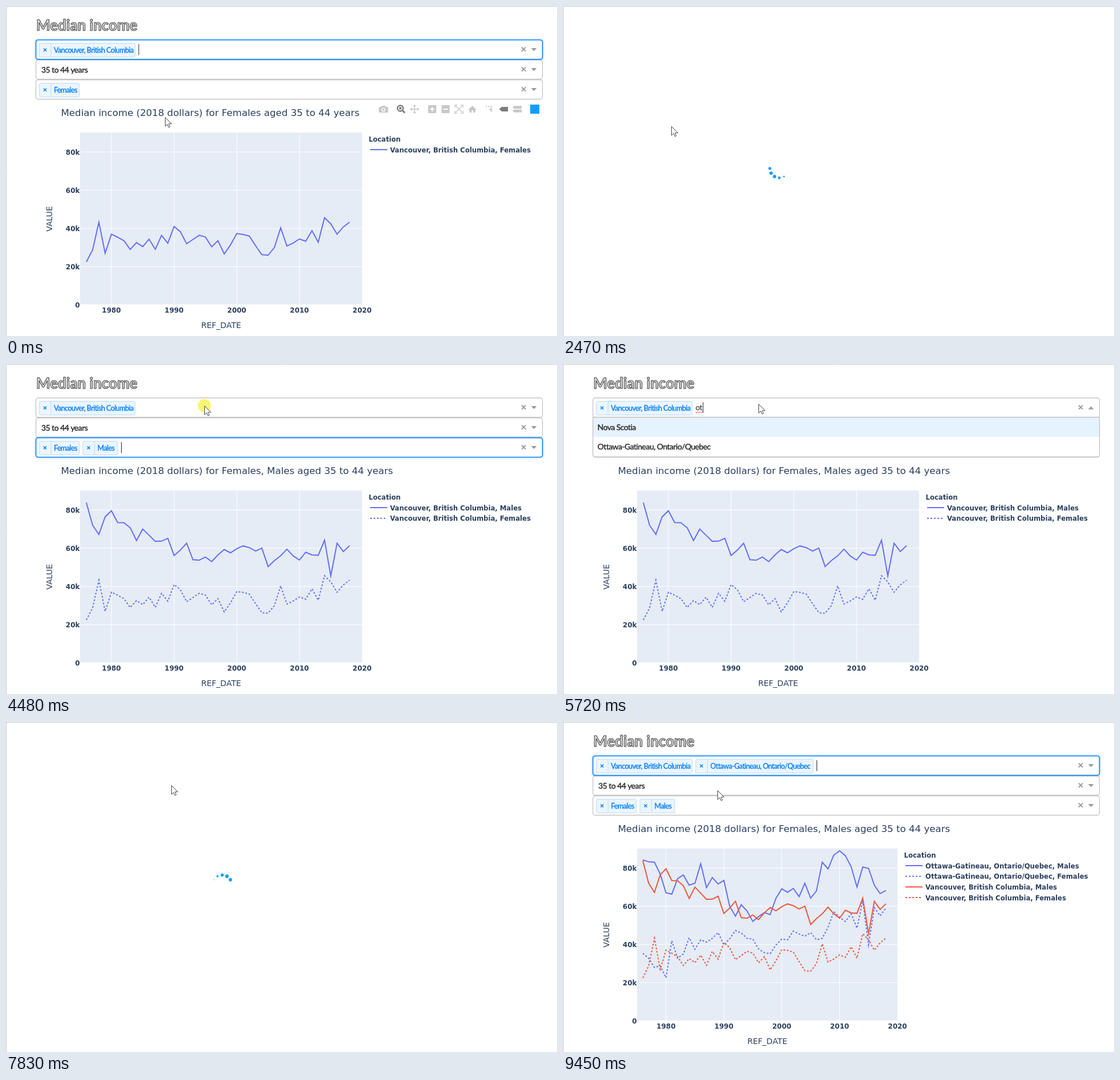
An HTML page with a canvas for the animation above (9.85 s loop, 967 by 579 pixels).

```html
<!DOCTYPE html>
<html lang="en">
<head>
<meta charset="utf-8">
<title>Median income</title>
<style>
  html, body { margin: 0; width: 100%; height: 100%; overflow: hidden; background: #fff; }
  canvas { display: block; }
</style>
</head>
<body>
<canvas id="stage" width="967" height="579"></canvas>
<script>
const ctx = document.getElementById('stage').getContext('2d');
const LOOP = 9850;
const BLUE = '#007eff', INK = '#2a3f5f', INDIGO = '#636efa', RED = '#ef553b';
const PLAIN = '"DejaVu Sans", sans-serif', HAND = 'Lato, sans-serif';
const ROW_Y = [59, 94, 129], LEFT = 52.5, WIDTH = 889;
const PLOT = { left: 130, top: 222, bottom: 524.5 };

// Yearly values in thousands, 1976 to 2018
const vancouverFemales = [22.5, 28.8, 43.3, 27, 37, 35.4, 33.6, 29, 32.6, 30.5, 34.4, 29.1, 36.4, 32.3, 41,
  38.3, 32, 34.2, 36.4, 35.5, 30.4, 33.6, 26.7, 31.4, 37.3, 36.9, 36, 31, 26.3, 26,
  30, 40.3, 30.8, 32.4, 34.5, 33.3, 38.8, 32.8, 45.6, 42.4, 37, 40.8, 43.3];
const vancouverMales = [83.8, 72, 67.2, 76.4, 79.6, 73.4, 73.3, 70.7, 64, 70, 66.8, 63.6, 63.7, 65.2, 56.2,
  59, 62.6, 54, 53.7, 55.4, 53, 56.5, 59.3, 57.6, 59.7, 61.2, 60.3, 58.5, 60, 50.4,
  53.5, 56, 59.5, 56, 53.8, 57.9, 56.5, 56.3, 64.2, 45.5, 62.6, 58.3, 61.3];
const ottawaMales = [84.2, 83.2, 83, 76.8, 67, 66.3, 74.4, 76.3, 71, 72, 82.2, 69.7, 75, 71.6, 73.5,
  60, 54.8, 60.8, 57.5, 52, 54.6, 56.7, 55.6, 64.2, 69.1, 67.3, 69.3, 65, 72, 64.2,
  68, 83, 79.5, 86.8, 89, 86.4, 80.6, 70, 80.5, 79.8, 71, 66.6, 68.2];
const ottawaFemales = [35.3, 32.8, 28, 28.8, 22.6, 42, 32.8, 35, 43.5, 37.5, 42.4, 41.2, 43.2, 46.2, 39.8,
  43, 47.3, 46, 43.2, 42.8, 37.6, 35.7, 35.2, 39.7, 42.8, 42.4, 47, 45.5, 44.3, 46.2,
  42.5, 43.2, 49, 57.2, 54.2, 52, 56, 48.5, 63, 39.8, 59.2, 55, 59];

const VANCOUVER = { label: 'Vancouver, British Columbia', width: 169 };
const OTTAWA = { label: 'Ottawa-Gatineau, Ontario/Quebec', width: 207 };
const FEMALES = { label: 'Females', width: 71 };
const MALES = { label: 'Males', width: 62 };
const LOCATIONS = ['Canada', 'Atlantic provinces', 'Newfoundland and Labrador', 'Prince Edward Island',
  'Nova Scotia', 'New Brunswick', 'Quebec', 'Ontario', 'Manitoba', OTTAWA.label, 'Toronto, Ontario'];

// Each row holds from its start time until the next one
const CURSOR = [
  [0, 279, 195], [450, 272, 190], [620, 250, 172], [790, 228, 155], [960, 216, 148],
  [1620, 212, 170], [1690, 207, 193], [1860, 190, 211],
  [3790, 205, 200], [3960, 250, 160], [4130, 310, 105], [4310, 340, 80], [4480, 348, 73], [4630, 343, 70],
  [6590, 325, 88], [6700, 300, 104], [6820, 291, 111], [7130, 290, 111],
  [9070, 285, 113], [9260, 276, 118], [9450, 271, 120]];
const TYPED = [[0, ''], [4940, 'o'], [5720, 'ot'], [5950, 'ott'], [7430, '']];
// Start, focused row, whether its menu is open, caret blink origin
const FOCUS = [[0, 0, false, -380], [1130, 2, true, 1690], [2470, 2, false, 3250],
  [4630, 0, true, 4630], [7430, 0, false, 8270]];
const CLICKS = [[960, 1300], [2160, 2470], [4480.1, 4940], [7130, 7430]];
const LOADING = [[2470, 3250], [7430, 8210]];

const at = (keys, t) => keys.findLast(key => key[0] <= t);
const within = (spans, t) => spans.some(([from, to]) => t >= from && t < to);
const mod = (a, n) => ((a % n) + n) % n;

function text(string, x, y, font, color, align = 'left', spacing = 0) {
  ctx.font = font;
  ctx.fillStyle = color;
  ctx.textAlign = align;
  ctx.letterSpacing = spacing + 'px';
  ctx.fillText(string, x, y);
}

function handText(string, x, y, size, color) {
  text(string, x, y, `${size}px ${HAND}`, color, 'left', -0.53);
  ctx.strokeStyle = color;
  ctx.lineWidth = 0.35;
  ctx.strokeText(string, x, y);
}

function line(points, color, width, dash = []) {
  ctx.beginPath();
  points.forEach(([x, y]) => ctx.lineTo(x, y));
  ctx.strokeStyle = color;
  ctx.lineWidth = width;
  ctx.setLineDash(dash);
  ctx.stroke();
  ctx.setLineDash([]);
}

function shape(points, color) {
  ctx.beginPath();
  points.forEach(([x, y]) => ctx.lineTo(x, y));
  ctx.closePath();
  ctx.fillStyle = color;
  ctx.fill();
}

function box(x, y, w, h, radius, fill, stroke, width = 1) {
  ctx.beginPath();
  ctx.roundRect(x, y, w, h, radius);
  if (fill) { ctx.fillStyle = fill; ctx.fill(); }
  if (stroke) { ctx.strokeStyle = stroke; ctx.lineWidth = width; ctx.stroke(); }
}

function dot(x, y, r, color) {
  ctx.beginPath();
  ctx.arc(x, y, r, 0, 7);
  ctx.fillStyle = color;
  ctx.fill();
}

function cross(x, y, r, color, width) {
  line([[x - r, y - r], [x + r, y + r]], color, width);
  line([[x - r, y + r], [x + r, y - r]], color, width);
}

function drawHeading() {
  ctx.lineJoin = 'round';
  text('Median income', 53, 43, `bold 26px ${HAND}`, '#ddd');
  ctx.strokeStyle = '#333';
  ctx.lineWidth = 1;
  ctx.strokeText('Median income', 53, 43);
  ctx.lineJoin = 'miter';
}

function drawRow(row, tags, focused, open, typed, caretOn) {
  const y = ROW_Y[row];
  const active = focused && !open;
  if (active) box(LEFT - 2, y - 1.5, WIDTH + 4, 38, 6, null, 'rgba(0,126,255,.1)', 3);
  box(LEFT, y + 0.5, WIDTH, 34, 4, '#fff', active ? BLUE : '#c4c4c4', active ? 1.6 : 1.3);
  let x = 58;
  for (const { label, width } of tags) {
    box(x + 0.5, y + 6.5, width - 1, 24, 2, '#ebf5ff', '#b9dbff');
    line([[x + 21, y + 6.5], [x + 21, y + 30.5]], '#b9dbff', 1);
    cross(x + 10.5, y + 18, 2.5, BLUE, 1.5);
    handText(label, x + 26, y + 22.5, 12.5, BLUE);
    x += width + 5.5;
  }
  if (!tags.length) handText('35 to 44 years', 62, y + 22.5, 14, '#222');
  if (focused) {
    let end = x;
    if (typed) {
      text(typed, x, y + 22, `14px ${HAND}`, '#222', 'left', -0.5);
      end += ctx.measureText(typed).width + 1;
      const wave = [];
      for (let i = x; i < end; i += 2) wave.push([i, y + 25 + (wave.length % 2) * 1.6]);
      line(wave, '#e33', 1);
    }
    if (caretOn) line([[end + 0.5, y + 8], [end + 0.5, y + 27]], '#222', 1);
  }
  cross(908.5, y + 17, 3.6, '#999', 1.9);
  const flip = open ? -1 : 1, mid = y + (open ? 18 : 17.5);
  shape([[921.5, mid - 2.5 * flip], [931.5, mid - 2.5 * flip], [926.5, mid + 2.5 * flip]], '#999');
}

function drawMenu(row, options, highlighted) {
  const top = ROW_Y[row] + 34.5, step = 34.5;
  const height = Math.min(options.length * step, 193);
  ctx.save();
  ctx.beginPath();
  ctx.roundRect(LEFT, top, WIDTH, height + 0.5, [0, 0, 4, 4]);
  ctx.clip();
  ctx.fillStyle = '#fff';
  ctx.fill();
  options.forEach((option, i) => {
    const y = top + i * step;
    if (i === highlighted) box(LEFT, y, WIDTH, step, 0, '#e5f2ff');
    handText(option, 60.5, y + 22, 14, '#222');
  });
  ctx.restore();
  box(LEFT, top, WIDTH, height + 0.5, [0, 0, 4, 4], null, '#c4c4c4', 1.3);
}

function drawChart(sexes, series, right) {
  const { left, top, bottom } = PLOT;
  const xOf = year => left + (year - 1975) * (right - left) / 45;
  const yOf = value => bottom - value * 3.355;
  box(left, top, right - left, bottom - top, 0, '#e5ecf6');
  for (let year = 1980; year <= 2020; year += 10) {
    const x = xOf(year);
    if (year < 2020) line([[x, top], [x, bottom]], '#fff', 1);
    text(String(year), x, 538, `bold 12px ${PLAIN}`, INK, 'center');
  }
  for (let value = 0; value <= 80; value += 20) {
    const y = yOf(value);
    line([[left, y], [right, y]], '#fff', value ? 1 : 2);
    text(value ? value + 'k' : '0', 129.5, y + 4.5, `bold 12px ${PLAIN}`, INK, 'right');
  }
  for (const { data, color, dash } of series)
    line(data.map((value, i) => [xOf(1976 + i), yOf(value)]), color, 2, dash);

  const wide = right === 641 || right === 603;
  text(`Median income (2018 dollars) for ${sexes} aged 35 to 44 years`, wide ? 97.5 : 96.5, 193,
    `16.66px ${PLAIN}`, INK);
  text('REF_DATE', (left + right) / 2, 565, `14px ${PLAIN}`, INK, 'center');
  ctx.save();
  ctx.translate(81, 373.5);
  ctx.rotate(-Math.PI / 2);
  text('VALUE', 0, 0, `14px ${PLAIN}`, INK, 'center');
  ctx.restore();

  const legend = right + 11.5;
  text('Location', legend, 237.5, `bold 11.65px ${PLAIN}`, INK);
  series.forEach(({ name, color, dash }, i) => {
    const y = 252 + i * 18.7;
    line([[legend + 2.5, y], [legend + 32.5, y]], color, 2, dash);
    text(name, legend + 37.5, y + 4.5, `bold 11.65px ${PLAIN}`, INK);
  });
}

function drawToolbar() {
  const pale = '#c7c7c7', dark = '#7c7c7c', y = 181;
  // camera
  box(654.5, y - 4, 16, 10, 1.5, pale);
  box(659, y - 6, 7, 3, 1, pale);
  dot(662.5, y + 1, 3.5, '#fff');
  dot(662.5, y + 1, 2, pale);
  // magnifier
  ctx.beginPath();
  ctx.arc(692, y - 1.5, 5, 0, 7);
  ctx.strokeStyle = dark;
  ctx.lineWidth = 2.4;
  ctx.stroke();
  box(690, y - 3.5, 4, 4, 0, dark);
  line([[695.5, y + 2], [700, y + 6.5]], dark, 2.8);
  // pan
  line([[710, y], [724, y]], pale, 1.5);
  line([[717, y - 7], [717, y + 7]], pale, 1.5);
  for (let i = 0; i < 4; i++) {
    const dx = Math.cos(i * Math.PI / 2), dy = Math.sin(i * Math.PI / 2);
    shape([[717 + 8 * dx, y + 8 * dy], [717 + 5 * dx + 3 * dy, y + 5 * dy + 3 * dx],
      [717 + 5 * dx - 3 * dy, y + 5 * dy - 3 * dx]], pale);
  }
  // zoom in, zoom out
  for (const x of [748, 771.5]) {
    box(x - 7, y - 7, 14, 14, 1, pale);
    line([[x - 4, y], [x + 4, y]], '#fff', 2);
  }
  line([[748, y - 4], [748, y + 4]], '#fff', 2);
  // autoscale
  cross(795, y, 5, pale, 1.5);
  for (const sx of [-1, 1]) for (const sy of [-1, 1])
    line([[795 + 3 * sx, y + 7 * sy], [795 + 7 * sx, y + 7 * sy], [795 + 7 * sx, y + 3 * sy]], pale, 1.6);
  // home
  shape([[811, y + 1], [818.5, y - 6], [826, y + 1]], pale);
  box(813.5, y, 10, 6, 0, pale);
  box(817, y + 2, 3, 4, 0, '#fff');
  // spike lines
  dot(851, y + 0.5, 2.2, pale);
  line([[842, y - 4.5], [852, y - 4.5]], pale, 2, [2, 2]);
  line([[852, y - 5], [852, y + 6]], pale, 2, [2, 2]);
  // hover labels
  shape([[865.5, y], [870, y - 4], [881, y - 4], [881, y + 4], [870, y + 4]], dark);
  for (const dy of [-3.2, 3.2])
    shape([[889, y + dy], [892, y + dy - 2.5], [905, y + dy - 2.5], [905, y + dy + 2.5], [892, y + dy + 2.5]], pale);
  box(920, y - 8, 16, 16, 0, '#119dff');
}

function drawSpinner(t) {
  const head = 6 + (t - 2470) / 100;
  for (let i = 0; i < 12; i++) {
    const behind = mod(head - i, 12);
    const r = behind < 6 ? 3.1 * Math.max(0, Math.cos((behind - 1.4) * 0.42)) : 0;
    const angle = i * Math.PI / 6;
    dot(379.5 + 16.5 * Math.cos(angle), 285 + 16.5 * Math.sin(angle), r, '#119dff');
  }
}

function drawCursor(x, y) {
  ctx.save();
  ctx.translate(x + 0.5, y + 0.5);
  const arrow = [[0, 0], [0, 15.5], [3.6, 12.2], [6, 17.4], [8.4, 16.4], [6, 11.3], [11, 11]];
  shape(arrow, '#fff');
  line([...arrow, arrow[0]], '#444', 1);
  ctx.restore();
}

function getSeries(bothSexes, bothPlaces) {
  const make = (place, sex, data, color) =>
    ({ name: `${place.label}, ${sex}`, data, color, dash: bothSexes && sex === 'Females' ? [3, 3] : [] });
  const color = bothPlaces ? RED : INDIGO;
  const series = [make(VANCOUVER, 'Females', vancouverFemales, color)];
  if (bothSexes) series.unshift(make(VANCOUVER, 'Males', vancouverMales, color));
  if (bothPlaces) series.unshift(make(OTTAWA, 'Males', ottawaMales, INDIGO),
    make(OTTAWA, 'Females', ottawaFemales, INDIGO));
  return series;
}

function drawPage(t, cursorY) {
  const [, focus, open, blink] = at(FOCUS, t);
  const typed = at(TYPED, t)[1];
  const caretOn = mod(t - blink, 1060) < 530 || (t >= 8210 && t < blink);
  const bothSexes = t >= 2470, bothPlaces = t >= 7430;
  const places = bothPlaces ? [VANCOUVER, OTTAWA] : [VANCOUVER];
  const sexes = bothSexes ? [FEMALES, MALES] : [FEMALES];
  // The chart settles 16px narrower shortly after each reload
  const settling = within([[3250, 3790], [8210, 8750]], t);
  const right = (bothPlaces ? 587 : 625) + (settling ? 16 : 0);

  drawHeading();
  drawChart(sexes.map(sex => sex.label).join(', '), getSeries(bothSexes, bothPlaces), right);
  if (cursorY > 164 && !open) drawToolbar();
  // The focused row goes last so that its border stays on top
  [0, 1, 2].sort((a, b) => (a === focus) - (b === focus)).forEach(row =>
    drawRow(row, [places, [], sexes][row], row === focus, open && row === focus, typed, caretOn));
  if (open && focus === 2) drawMenu(2, ['Both sexes', 'Males'], t < 1860 ? 0 : 1);
  if (open && focus === 0)
    drawMenu(0, LOCATIONS.filter(name => name.toLowerCase().includes(typed)), 0);
}

function draw(t) {
  const [, x, y] = at(CURSOR, t);
  ctx.fillStyle = '#fff';
  ctx.fillRect(0, 0, 967, 579);
  if (within(LOADING, t)) drawSpinner(t);
  else drawPage(t, y);
  line([[967, 0.5], [0.5, 0.5], [0.5, 579]], '#c8c8c8', 1);
  if (within(CLICKS, t)) dot(x, y, 11.5, 'rgba(244,244,80,.8)');
  drawCursor(x, y);
}

function frame() {
  draw(performance.now() % LOOP);
  requestAnimationFrame(frame);
}
frame();
</script>
</body>
</html>
```
